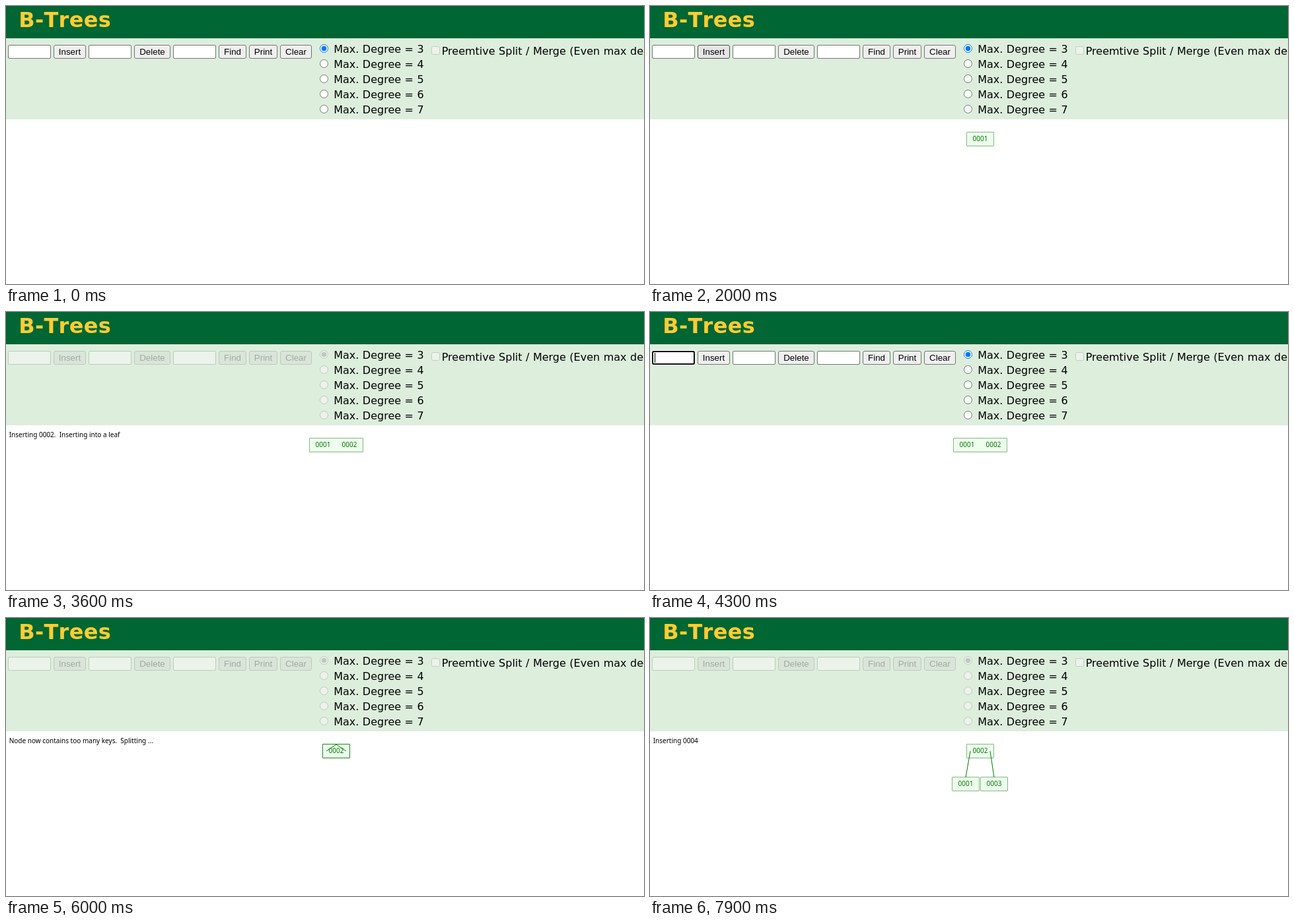
Recreate the animation shown at these times as an HTML page. Size 966x422 px, loop 8 s.

```html
<!DOCTYPE html>
<html lang="en">
<head>
<meta charset="utf-8">
<title>B-Trees</title>
<style>
  html, body { margin: 0; width: 100%; height: 100%; overflow: hidden; background: #fff; }
  svg { display: block; position: absolute; left: 0; top: 0; }
  text { white-space: pre; }
  .title { font: bold 32px "DejaVu Sans", sans-serif; letter-spacing: .3px; font-kerning: none; fill: #fc3; }
  .label { font: 16px "DejaVu Sans", sans-serif; word-spacing: .4px; fill: #000; }
  .ui { font: 13.333px "Liberation Sans", Arial, sans-serif; }
  .tree { font: 10px "Noto Sans", sans-serif; }
  .mid { text-anchor: middle; }
</style>
</head>
<body>
<svg width="966" height="422" viewBox="0 0 966 422">
  <rect width="966" height="49" fill="#063"/>
  <rect y="49" width="966" height="123" fill="#ded"/>
  <text class="title" x="19.2" y="32">B-Trees</text>
  <g id="labels"></g>
  <g id="controls"></g>
  <g id="tree"></g>
</svg>
<script>
const LOOP = 8000, STEP = 100;
const GREEN = '#007700', FILL = '#eeffee';
const $ = id => document.getElementById(id);

const FIELDS = [3, 125, 253];
const BUTTONS = [['Insert', 72, 49], ['Delete', 194, 55], ['Find', 322, 42], ['Print', 368, 43], ['Clear', 415, 48]];
const BUTTON_LOOK = {
  plain: ['#efefef', '#767676', '#000'],
  hover: ['#e5e5e5', '#4f4f4f', '#000'],
  press: ['#f5f5f5', '#8d8d8d', '#000'],
  off: ['#dae5da', '#bec9be', '#a0aaa0']
};

// time, Insert button, first field, field value
const UI = [
  [0, 'plain', 'plain', ''],
  [800, 'plain', 'hover', ''],
  [1000, 'plain', 'focus', ''],
  [1300, 'hover', 'focus', '1'],
  [1600, 'press', 'plain', '1'],
  [1700, 'off', 'off', ''],
  [2000, 'hover', 'plain', ''],
  [2300, 'plain', 'hover', ''],
  [2400, 'plain', 'focus', ''],
  [2600, 'plain', 'focus', '2'],
  [2700, 'hover', 'focus', '2'],
  [2900, 'press', 'plain', '2'],
  [3000, 'off', 'off', ''],
  [4000, 'hover', 'plain', ''],
  [4100, 'plain', 'hover', ''],
  [4300, 'plain', 'focus', ''],
  [4600, 'plain', 'focus', '3'],
  [4800, 'hover', 'focus', '3'],
  [4900, 'press', 'plain', '3'],
  [5000, 'off', 'off', ''],
  [6400, 'hover', 'plain', ''],
  [6500, 'plain', 'hover', ''],
  [6800, 'plain', 'focus', ''],
  [7300, 'plain', 'blink', ''],
  [7400, 'plain', 'focus', '4'],
  [7700, 'hover', 'focus', '4'],
  [7800, 'press', 'plain', '4'],
  [7900, 'off', 'off', '']
];

// time, message, keys in the root, highlight width
const TREE = [
  [0, '', 0, 0],
  [1700, 'Inserting 0001', 0, 0],
  [2000, '', 1, 0],
  [3000, 'Inserting 0002', 1, 0],
  [3300, 'Inserting 0002', 1, 5],
  [3400, 'Inserting 0002', 1, 6],
  [3500, 'Inserting 0002', 1, 4],
  [3600, 'Inserting 0002.  Inserting into a leaf', 2, 0],
  [3700, '', 2, 0],
  [5000, 'Inserting 0003', 2, 0],
  [5300, 'Inserting 0003', 2, 5],
  [5400, 'Inserting 0003', 2, 6],
  [5500, 'Inserting 0003', 2, 7],
  [5600, 'Inserting 0003.  Inserting into a leaf', 3, 0],
  [5700, 'Node now contains too many keys.  Splitting ...', 3, 5],
  [5800, 'Node now contains too many keys.  Splitting ...', 3, 7],
  [5900, 'Node now contains too many keys.  Splitting ...', 3, 6],
  [6000, 'Node now contains too many keys.  Splitting ...', 3, 0],
  [6300, '', 3, 0],
  [7900, 'Inserting 0004', 3, 0]
];
const SPLIT = 6000, SPLIT_TIME = 280;

const rowAt = (table, t) => table.filter(row => row[0] <= t).pop();
const text = (cls, x, y, s, fill) =>
  `<text class="${cls}" x="${x}" y="${y}"${fill ? ` fill="${fill}"` : ''}>${s}</text>`;
const rect = (x, y, w, h, fill, stroke = 'none', r = 0, line = 1) =>
  `<rect x="${x}" y="${y}" width="${w}" height="${h}" rx="${r}" fill="${fill}" stroke="${stroke}" stroke-width="${line}"/>`;
const circle = (x, y, r, fill, stroke = 'none') =>
  `<circle cx="${x}" cy="${y}" r="${r}" fill="${fill}" stroke="${stroke}"/>`;

function field(x, state, value) {
  const off = state === 'off', focus = state === 'focus' || state === 'blink';
  const edge = off ? '#bec9be' : state === 'hover' ? '#4f4f4f' : '#767676';
  let s = rect(x + .5, 59.5, 64, 20, off ? '#ebf3eb' : '#fff', edge, 1.5);
  if (focus) {
    s += rect(x - .5, 58.5, 66, 22, 'none', '#fff', 3) +
      rect(x + 1, 60, 63, 19, 'none', '#101010', 2, 2);
  }
  if (value) s += text('ui', x + 3.2, 74, value, '#000');
  if (state === 'focus') s += rect(x + (value ? 11 : 4), 62, 1, 15, '#000');
  return s;
}

function button([name, x, w], state) {
  const [fill, edge, ink] = BUTTON_LOOK[state];
  return rect(x + .5, 59.5, w - 1, 20, fill, edge, 2.5) + text('ui mid', x + w / 2, 74, name, ink);
}

function radio(i, off) {
  const y = 64.5 + 23 * i, on = i === 0;
  const edge = off ? '#bec9be' : on ? '#0075ff' : '#767676';
  return circle(481.5, y, 6, off ? '#ebf3eb' : '#fff', edge) +
    (on ? circle(481.5, y, 3.8, off ? '#bec9be' : edge) : '');
}

function controls(t) {
  const [, insert, first, value] = rowAt(UI, t), off = insert === 'off';
  return FIELDS.map((x, i) => field(x, i ? (off ? 'off' : 'plain') : first, i ? '' : value)).join('') +
    BUTTONS.map((b, i) => button(b, i && !off ? 'plain' : insert)).join('') +
    [0, 1, 2, 3, 4].map(i => radio(i, off)).join('');
}

// The fill covers the inner half of the outline.
function node(x, y, keys, glow = 0) {
  const w = 40 * keys.length, left = x - w / 2, top = y - 10;
  return (glow ? rect(left - glow, top - glow, w + 2 * glow, 20 + 2 * glow, '#f00') : '') +
    rect(left, top, w, 20, 'none', GREEN) +
    rect(left, top, w, 20, FILL) +
    keys.map((k, i) => text('tree mid', left + 20 + 40 * i, y + 3, '000' + k, GREEN)).join('');
}

const edge = (x1, y1, x2, y2) => `<path d="M${x1} ${y1}L${x2} ${y2}" stroke="${GREEN}"/>`;

function tree(t) {
  const [, message, count, glow] = rowAt(TREE, t);
  let s = message && text('tree', 4.7, 190, message, '#000');
  if (t >= SPLIT) {
    const p = Math.min(1, (t - SPLIT) / SPLIT_TIME);
    const y = 202 + 50 * p, xl = 500 - 22 * p, xr = 500 + 21 * p;
    s += node(xl, y, [1]) + node(xr, y, [3]) + node(500, 202, [2]) +
      edge(485, 202, xl, y - 10) + edge(515, 202, xr, y - 10);
  } else if (count) {
    s += node(500, 202, [1, 2, 3].slice(0, count), glow);
  }
  return s;
}

$('labels').innerHTML =
  [3, 4, 5, 6, 7].map((n, i) => text('label', 496.2, 71 + 23 * i, 'Max. Degree = ' + n)).join('') +
  rect(644.5, 61.5, 12, 12, '#ebf3eb', '#c3cdc3', 2) +
  text('label', 659.7, 74, 'Preemtive Split / Merge (Even max degree only)');

let shown = -1;
const start = performance.now();
function draw(now) {
  const t = Math.floor((Math.max(0, now - start) % LOOP) / STEP) * STEP;
  if (t !== shown) {
    shown = t;
    $('controls').innerHTML = controls(t);
    $('tree').innerHTML = tree(t);
  }
  requestAnimationFrame(draw);
}
draw(start);
</script>
</body>
</html>
```
